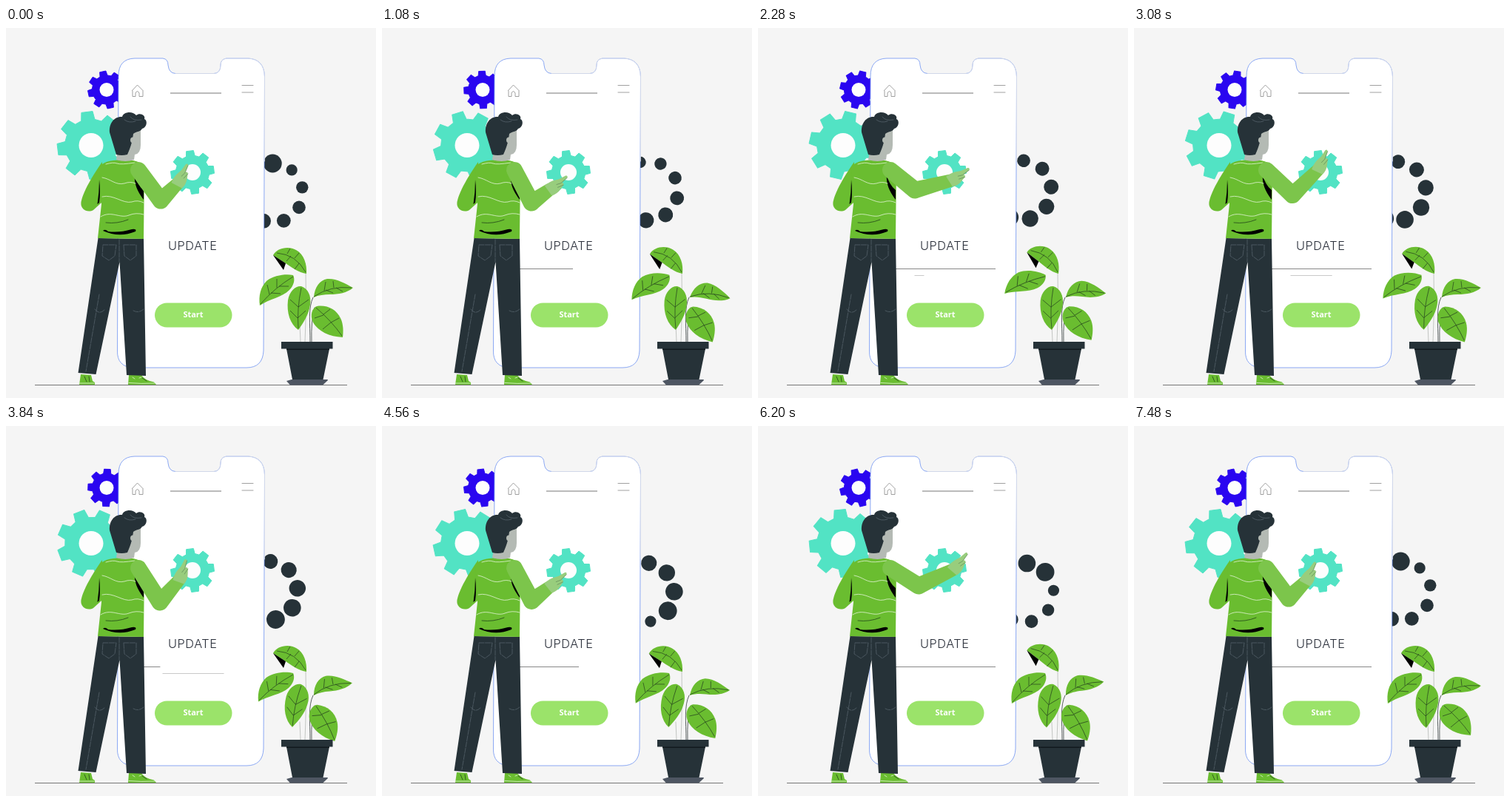
An HTML page that plays this animation: 500 by 500 pixels, repeating every 7.72 s.

```html
<!DOCTYPE html>
<html lang="en">
<head>
<meta charset="utf-8">
<title>Update</title>
<style>
html, body { margin: 0; width: 100%; height: 100%; overflow: hidden; background: #f5f5f5; }
svg { display: block; width: 100vw; height: 100vh; }
.navy { fill: #263238; }
.shirt { fill: #6abd30; }
.skin { fill: #b4bab4; }
.line { fill: none; stroke-width: .8; stroke-linecap: round; }
.leaf path:first-child { fill: #6abd30; }
.vein { fill: none; stroke: #24401f; stroke-width: .7; }
</style>
</head>
<body>
<svg id="stage" viewBox="0 0 500 500">
  <rect width="500" height="500" fill="#f5f5f5"/>
  <g id="dots" class="navy"></g>
  <g id="gears"></g>

  <!-- phone -->
  <path fill="#fff" stroke="#6f94f2" stroke-width=".8" d="M152 65Q152 41.500 174 41H212Q219 42 219 50Q220 61 229 61.500H281Q290 61 290 50Q290 42 298 41H327Q349 42 349.500 66L348 436Q347 459 325 459H172Q150 458 150.500 436Z"/>
  <path class="line" stroke="#e2e4e8" d="M229 61.500H281Q290 61 290 50Q290 42 298 41H327Q349 42 349.500 66V180"/>
  <path class="line" stroke="#888" stroke-width=".7" d="M170.500 84.500L177.500 77L185 84.500M171 85V92.500H175V88Q177.500 83 180 88V92.500H185V85M319 77.500H334M319 87H334"/>
  <path stroke="#777" d="M222 88H291"/>
  <text x="252.300" y="300" text-anchor="middle" font-family="Inter, sans-serif" font-size="16.300" font-weight="300" letter-spacing=".6" fill="#2a2f3a">UPDATE</text>
  <path id="bar1" stroke="#888"/>
  <path id="bar2" stroke="#bbb" stroke-width=".8"/>
  <rect x="201" y="371.500" width="104.500" height="33" rx="16.500" fill="#9be36a"/>
  <text x="253" y="391" text-anchor="middle" font-family="'Open Sans', sans-serif" font-weight="700" font-size="11" fill="#fff">Start</text>
  <g id="front"></g>
  <path stroke="#777" d="M39 482.500H461"/>

  <!-- legs and shoes -->
  <path class="shirt" d="M101 468L115 469L117 477L120 479V482H99Z"/>
  <path class="shirt" d="M166 469H183Q187 476 200 478.500L203 482H165Z"/>
  <path class="line" stroke="#e4f5d8" d="M99 480H119M166 479.500Q182 481 201 480M171 472L174 474M180 473L183 472"/>
  <path class="line" stroke="#23461a" d="M106 471L109 478M112 471L113 478M184 473L190 477"/>
  <path class="navy" d="M124.500 284L186 285L189 470L163 469L153.500 316L121.500 468L97.500 466Z"/>
  <path class="line" stroke="#55616a" stroke-width=".6" d="M131 293H149L147 308L139 314L130 308ZM159 293H176V308L168 314L160 308ZM153 286V316M120 380Q126 388 133 381M172 382Q179 386 186 380M126 360L108 464" stroke-dasharray="7 1.500"/>

  <!-- torso and head -->
  <path class="shirt" d="M130 181C121 194 105 218 101.500 235C100 246 111 250 118 246L129 236Z"/>
  <path class="shirt" d="M126 190Q128 180 150 178.500L172 179Q184 181 187 191L186 285L124 284L129 238Z"/>
  <path d="M126 205Q128 222 126 236L123.500 238Q126 222 126 205Z"/>
  <path d="M174 198Q177 212 186 219V232Q172 214 174 198Z"/>
  <path class="line" stroke="#e2f4d6" d="M135 184Q145 181 150 183T174 182M130 202C142 204 148 213 160 210Q168 207 175 210M130 228C145 224 158 238 170 235Q178 232 186 236M128 255C142 246 154 258 166 253Q176 249 186 252"/>
  <path class="line" stroke="#23461a" d="M135 263Q150 265 165 259"/>
  <path d="M131 274Q134 271 138 275Q153 277 170 272Q177 271 175 275Q153 284 131 274Z"/>
  <path class="skin" d="M170 141L182 137V158Q182 170 174 171L173 178Q162 182 149 178L151 165Z"/>
  <path class="navy" d="M149 171L140 141C139 128 147 119 157 120C159 113 171 112 176 118C181 114 189 118 187 123C192 125 190 135 184 136C181 141 177 139 172 143C171 152 169 160 164 171Q156 173 149 171Z"/>
  <circle class="skin" cx="172" cy="151.500" r="4"/>
  <path class="line" stroke="#55616a" stroke-width=".5" d="M160 124Q166 129 175 126M168 120Q172 126 183 124"/>

  <path id="arm" fill="#7cc54b"/>
  <g id="hand">
    <path fill="#98cd7d" d="M-3 -8Q6 -9 13 -6L18 -4L28 -2.500Q31 -1 28 1L18 2Q21 4 18 6L12 8Q4 11 -3 8Z"/>
    <path class="line" stroke="#6a9560" stroke-width=".6" d="M28 1L17 2L11 0M18 6L10 4"/>
  </g>

  <!-- plant -->
  <path class="line" stroke="#b5b9b5" d="M405 331Q406 380 404 424M397 400L398 424"/>
  <path class="line" stroke="#333b3c" d="M415 364C408 378 411 400 411 424M417 378Q412 395 413 424"/>
  <g id="plant"></g>
  <path class="navy" d="M372 424H441.500V433.500H437L428.500 475H387L379 433.500H372Z"/>
  <path fill="#11191d" d="M379 433.500H437L436.700 435H379.300Z"/>
  <path fill="#4e5662" d="M386 475H434.500L435 476L428 482.500H384L379 477Z"/>
</svg>
<script>
const $ = id => document.getElementById(id);
const add = (parent, tag, attrs) => {
  const el = document.createElementNS('http://www.w3.org/2000/svg', tag);
  for (const k in attrs) el.setAttribute(k, attrs[k]);
  return parent.appendChild(el);
};
const LOOP = 7720, TURN = 7120, SWING = TURN / 2;
const clamp = (x, lo, hi) => Math.min(hi, Math.max(lo, x));

// Periodic cubic curve through the values V at times T
function curve(T, V, period, t) {
  const n = T.length;
  const time = i => T[(i + n) % n] + period * Math.floor(i / n);
  const val = i => V[(i + n) % n];
  const slope = i => (val(i + 1) - val(i - 1)) / (time(i + 1) - time(i - 1));
  let i = n - 1;
  while (T[i] > t) i--;
  const h = time(i + 1) - time(i), u = (t - time(i)) / h, w = 1 - u;
  return w * w * ((1 + 2 * u) * val(i) + u * h * slope(i))
    + u * u * ((3 - 2 * u) * val(i + 1) - w * h * slope(i + 1));
}

// Spinner dots grow clockwise
for (let k = 1; k <= 9; k++) {
  const a = (40 * k - 91) * Math.PI / 180;
  add($('dots'), 'circle', { cx: 361 + 40 * Math.cos(a), cy: 223 + 40 * Math.sin(a), r: 7 + .6 * k });
}

function gear(parent, x, y, r, hole, color, start) {
  const pts = [];
  for (let k = 0; k < 8; k++)
    for (const [d, f] of [[-15, .77], [-9.5, 1], [9.5, 1], [15, .77]]) {
      const a = (start + 45 * k + d) * Math.PI / 180;
      pts.push([r * f * Math.cos(a), r * f * Math.sin(a)]);
    }
  const g = add(parent, 'g', { transform: `translate(${x} ${y})` });
  const wheel = add(g, 'polygon', { points: pts.join(' '), fill: color, stroke: color, 'stroke-linejoin': 'round' });
  add(g, 'circle', { r: hole, fill: '#fdfdfd' });
  return deg => wheel.setAttribute('transform', `rotate(${deg})`);
}
const turnSmall = gear($('gears'), 136, 83.5, 25.5, 9.5, '#2a06f0', -102);
const turnBig = gear($('gears'), 115, 158.5, 46, 16.5, '#52e3c4', -97);
gear($('front'), 252, 195, 29.5, 11, '#52e3c4', -97);

// Leaves: outline, veins, pivot and sway angles
const swayTimes = [0, 1080, 2280, 3840, 5240, 6200];
const leaves = [
  ['M361 307C366 297 382 294 392 300C403 306 407 320 406 332C396 331 384 322 378 318Z',
    'M366 304Q392 306 405 330M380 305L384 298M390 311L396 304M385 308L379 315M396 318L390 326', 406, 332,
    [0, 2, 5, 0, 0, 5], 'M361 307L378 318L375 327Z'],
  ['M343 375C341 362 344 350 352 342C362 334 378 332 388 334C391 340 389 348 383 354C373 364 356 366 343 375Z',
    'M344 373Q362 352 388 336M356 360L353 347M366 351L366 339M358 358L371 359M369 349L382 349', 389, 336,
    [0, 9, 18, 3, -.5, 0]],
  ['M395 408C384 400 379 385 381 368C383 355 392 348 399 349C408 352 413 362 411 374C409 388 402 398 395 408Z',
    'M395 406Q393 380 399 351M394 392L384 382M395 377L384 367M394 392L405 382M395 377L409 367', 398, 350,
    [0, -2, -2, 8, 6, 5]],
  ['M416 364C417 350 424 341 434 339C446 338 458 345 469 351C461 358 449 360 438 360C430 360 422 361 416 364Z',
    'M416 363Q438 348 467 351M430 355L432 343M443 351L442 342M432 354L442 358M446 351L455 356', 416, 364,
    [0, 15, 8, -4, 15, -6]],
  ['M455 418C437 417 422 410 415 398C410 388 414 378 420 376C434 374 446 380 452 392C456 400 456 410 455 418Z',
    'M419 378Q440 396 454 416M429 387L438 380M439 398L450 392M429 388L417 392M439 398L428 407', 417, 378,
    [0, 11, 6, 14, 0, 13]]
].map(([outline, veins, x, y, sway, under]) => {
  const g = add($('plant'), 'g', { class: 'leaf' });
  add(g, 'path', { d: outline });
  add(g, 'path', { d: veins, class: 'vein' });
  if (under) add(g, 'path', { d: under });
  return t => g.setAttribute('transform', `rotate(${curve(swayTimes, sway, TURN, t)} ${x} ${y})`);
});

// Arm pose over one swing: elbow, wrist and hand angle
const armTimes = [0, 280, 1080, 1680, 2280, 2640, 3100];
const pose = {
  ex: [209, 208, 202, 205, 212, 217, 214],
  ey: [233, 238, 236, 232, 219, 216, 226],
  wx: [232, 234, 227, 244, 261, 264, 248],
  wy: [210, 208, 218, 216, 206, 194, 192],
  turn: [-62, -70, -36, -31, -32, -49, -65]
};

// Limb between two circles
function limb(x1, y1, r1, x2, y2, r2) {
  const a = Math.atan2(y2 - y1, x2 - x1), s = Math.sin(a), c = Math.cos(a);
  return `M${x1 + r1 * s} ${y1 - r1 * c}L${x2 + r2 * s} ${y2 - r2 * c}`
    + `A${r2} ${r2} 0 0 1 ${x2 - r2 * s} ${y2 + r2 * c}L${x1 - r1 * s} ${y1 + r1 * c}`
    + `A${r1} ${r1} 0 0 1 ${x1 + r1 * s} ${y1 - r1 * c}Z`;
}

function drawArm(t) {
  const p = {};
  for (const k in pose) p[k] = curve(armTimes, pose[k], SWING, t % SWING);
  $('arm').setAttribute('d', limb(179, 192, 11, p.ex, p.ey, 11.5) + limb(p.ex, p.ey, 11.5, p.wx, p.wy, 8.5));
  $('hand').setAttribute('transform', `translate(${p.wx} ${p.wy}) rotate(${p.turn})`);
}

function drawBars(t) {
  const first = t < SWING ? t / 15 : (t - SWING) / 12.5;
  const second = t < 4000 ? (t - 2040) / 18.5 : 0;
  $('bar1').setAttribute('d', `M186 325.500h${clamp(first, 0, 135)}`);
  $('bar2').setAttribute('d', `M211.500 334.500h${clamp(second, 0, 83)}`);
}

function draw(now) {
  const t = Math.floor(now % LOOP / 40) * 40;
  const move = Math.min(t, TURN) % TURN;
  const deg = 360 * move / TURN;
  $('dots').setAttribute('transform', `rotate(${-deg} 357.5 222.5)`);
  turnSmall(deg);
  turnBig(-deg);
  leaves.forEach(sway => sway(move));
  drawArm(move);
  drawBars(t);
}

const begin = performance.now();
function tick() {
  draw(performance.now() - begin);
  requestAnimationFrame(tick);
}
tick();
</script>
</body>
</html>
```
